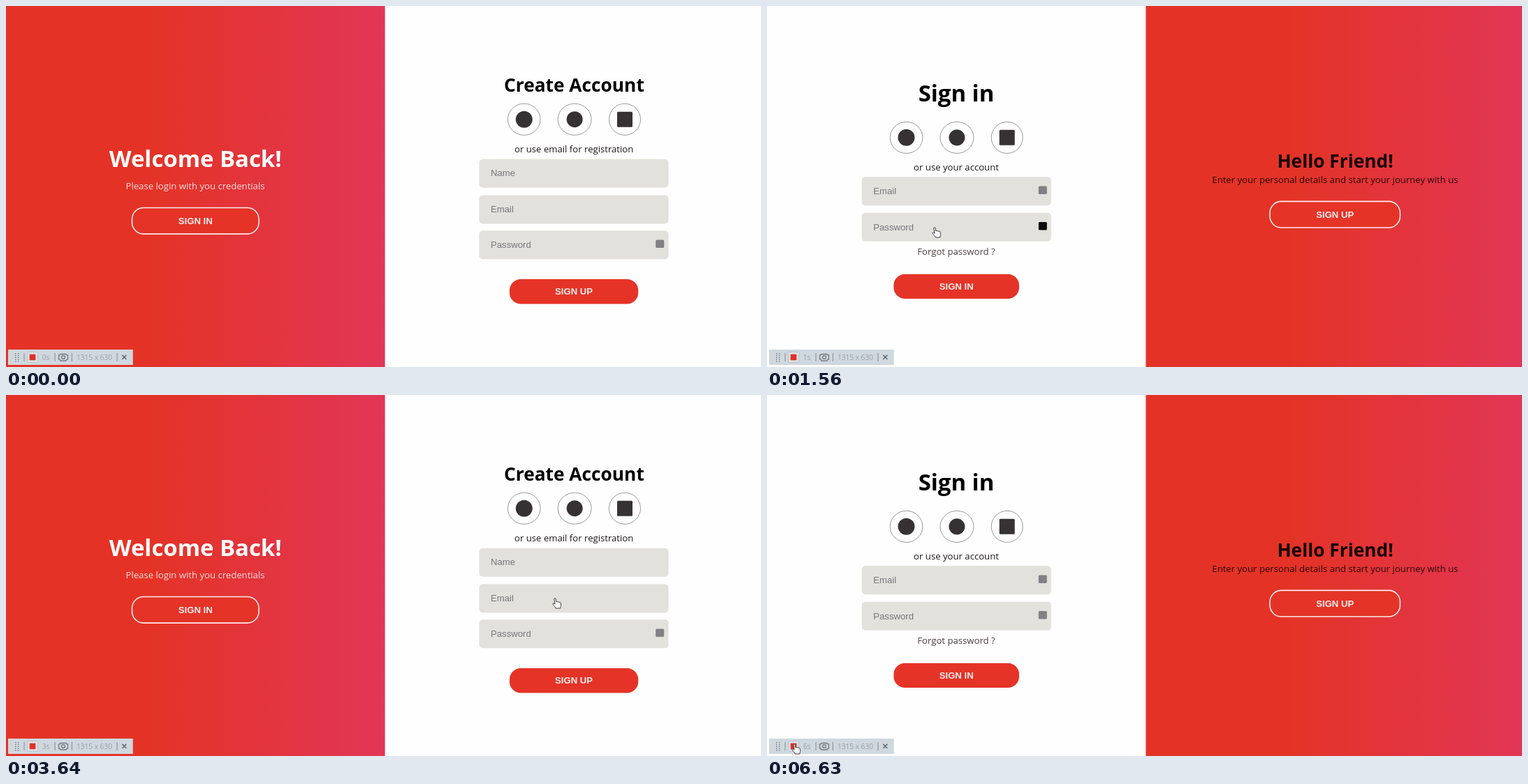
An HTML page for the animation above (6890 ms loop, 1081 px wide and 518 px high).

```html
<!DOCTYPE html>
<html lang="en">
<head>
<meta charset="utf-8">
<title>Sign in and sign up</title>
<style>
  html, body { margin: 0; width: 100%; height: 100%; overflow: hidden; background: #fefefe; }
  svg { display: block; width: 1081px; height: 518px; }
  text { font: 13.15px "Open Sans", sans-serif; text-anchor: middle; }
  .title { font-size: 26.3px; font-weight: 700; }
  .large { font-size: 32.9px; font-weight: 700; }
  .label { font: 700 13.15px "Liberation Sans", Arial, sans-serif; fill: #f4eeee; }
  .hint { font: 13.15px "Liberation Sans", Arial, sans-serif; fill: #77777a; text-anchor: start; }
  .bar { font-size: 10.1px; fill: #9b9fa4; text-anchor: start; }
</style>
</head>
<body>
<svg id="stage" viewBox="0 0 1081 518"></svg>
<script>
const RED = '#e53327';
const LOOP = 6890, STEP = 130;

const rect = (x, y, w, h, r, attrs) =>
  `<rect x="${x}" y="${y}" width="${w}" height="${h}" rx="${r}" ${attrs}/>`;
const text = (x, y, str, cls = '', attrs = '') =>
  `<text x="${x}" y="${y}" class="${cls}" ${attrs}>${str}</text>`;
const field = (x, y, hint) =>
  rect(x, y, 271, 41, 5, 'fill="#e2e1dc"') + text(x + 16.5, y + 24.7, hint, 'hint');
const fieldIcon = (x, y, id = '') =>
  rect(x, y, 12, 11.5, 1.5, `fill="#828084" id="${id}"`);
const solidButton = (x, y, w, label) =>
  rect(x, y, w, 35.3, 16, `fill="${RED}"`) + text(x + w / 2, y + 21.9, label, 'label');

// Outlined button with a hidden focus ring
const ghostButton = (x, y, w, label, ringId) =>
  rect(x, y, w, 37.6, 16.4, `fill="${RED}" stroke="#fbecec" stroke-width="1.6"`) +
  `<g id="${ringId}" fill="none">` +
  rect(x - 1, y - 1, w + 2, 39.6, 2.5, 'stroke="#fff" stroke-width="1.2"') +
  rect(x + .2, y + .2, w - .4, 37.2, 1.5, 'stroke="#111" stroke-width="1.6"') + '</g>' +
  text(x + w / 2, y + 23.2, label, 'label');

const socials = (x, y) =>
  [[0, 23.3], [72.4, 24], [144.2, 22.5]].map(([dx, rx]) =>
    `<ellipse cx="${x + dx}" cy="${y}" rx="${rx}" ry="22.6" fill="#fefefe" stroke="#999" stroke-width="1"/>`).join('') +
  `<g fill="#363234"><circle cx="${x}" cy="${y}" r="12"/><circle cx="${x + 72.4}" cy="${y}" r="11.5"/>` +
  rect(x + 133.2, y - 11, 22, 22, 1.5, '') + '</g>';

const signUpPage = `<g id="signUp">
  ${rect(0, 0, 542.6, 518, 0, 'fill="url(#warm)"')}
  ${text(271.2, 231, 'Welcome Back!', 'large', 'fill="#fff"')}
  ${text(271, 262.7, 'Please login with you credentials', '', 'fill="#fbdcdc"')}
  ${ghostButton(180.5, 289.5, 181.5, 'SIGN IN', 'signInRing')}
  ${text(813.4, 122.5, 'Create Account', 'title')}
  ${socials(741.8, 162.7)}
  ${text(813.2, 210.3, 'or use email for registration', '', 'fill="#1c1719"')}
  ${field(677.5, 219.7, 'Name')}${field(677.5, 271.4, 'Email')}${field(677.5, 322.3, 'Password')}
  ${fieldIcon(930.2, 335.4)}
  ${solidButton(721, 392.1, 184.2, 'SIGN UP')}
</g>`;

const signInPage = `<g id="signIn">
  ${rect(542.4, 0, 542.6, 518, 0, 'fill="url(#warm)"')}
  ${text(271, 137, 'Sign in', 'large')}
  ${socials(199.5, 188.8)}
  ${text(271, 235.8, 'or use your account', '', 'fill="#1c1719"')}
  ${field(135.8, 245.2, 'Email')}${field(135.8, 296.8, 'Password')}
  ${fieldIcon(388.8, 258.4)}${fieldIcon(388.8, 310, 'passwordIcon')}
  ${text(271, 356.8, 'Forgot password ?', '', 'fill="#4a4042"')}
  ${solidButton(181.4, 384.7, 179.6, 'SIGN IN')}
  ${text(813.6, 232, 'Hello Friend!', 'title', 'fill="#150304"')}
  ${text(813.4, 254.2, 'Enter your personal details and start your journey with us', '', 'fill="#2a0808"')}
  ${ghostButton(720, 280.4, 186.5, 'SIGN UP', 'signUpRing')}
</g>`;

const grip = Array.from({ length: 10 }, (_, i) =>
  rect(13 + (i % 2) * 4, 498 + (i >> 1) * 2.8, 1.4, 1.4, 0, 'fill="#777b80"')).join('');
const toolbar = `${rect(3, 493, 178.7, 22, 0, 'fill="#cfd8df"')}${grip}
  <path d="M26 498v12M70 498v12M94.3 498v12M159 498v12" stroke="#85898d"/>
  ${rect(30.5, 496.5, 15, 15, 1, 'fill="#dce2e6" stroke="#b5bcc2" stroke-width=".8"')}
  ${rect(33.7, 499.7, 8.6, 8.6, 0, 'fill="#df3026"')}
  ${text(51.7, 507.6, '0s', 'bar', 'id="seconds"')}
  <path d="M78 499.5h8l1.2 1.5h1.3v6h-1.3l-1.2 2h-8l-1.2-2h-1.3v-6h1.3z" fill="none" stroke="#777b80" stroke-width="1.3"/>
  <circle cx="82" cy="504" r="2.4" fill="none" stroke="#777b80" stroke-width="1.4"/>
  ${text(101, 507.6, '1315 x 630', 'bar')}
  <path d="M166.3 500.8l6 6.2m0-6.2l-6 6.2" stroke="#6c7074" stroke-width="1.7"/>`;

const hand = `<path id="hand" fill="#fff" stroke="#222" stroke-width=".9" stroke-linejoin="round"
  d="M-4.2-6.2c0-1.5 2.2-1.5 2.4 0l.7 4.2c.4-1 2-.9 2.2.2.5-.8 1.9-.6 2.1.5.6-.6 1.9-.3 2 .8
     l.4 3.2c.1 1.5-.7 2-.8 4.3h-6.6c-.2-1.7-2.3-3-4-5.600c-.7-1.300.8-2.100 1.700-1.200l1.200 1z"/>`;

const stage = document.getElementById('stage');
stage.innerHTML = `<defs><linearGradient id="warm">
    <stop offset=".38" stop-color="#e43326"/><stop offset="1" stop-color="#e23657"/>
  </linearGradient></defs>
  ${rect(0, 0, 1081, 518, 0, 'fill="#fefefe"')}${signUpPage}${signInPage}${toolbar}${hand}`;

// Pointer stops: time, x, y
const stops = [
  [130, 42, 508], [910, 243, 325], [2210, 243, 325], [3120, 789, 299],
  [3900, 789, 299], [4810, 289, 321], [5720, 289, 321], [6630, 42, 508]
];

function pointerAt(t) {
  const next = stops.findIndex(s => s[0] > t);
  if (next < 0) return stops[stops.length - 1].slice(1);
  if (next === 0) return stops[0].slice(1);
  const [t0, x0, y0] = stops[next - 1], [t1, x1, y1] = stops[next];
  const u = (t - t0) / (t1 - t0), ease = u * u * (3 - 2 * u);
  return [x0 + (x1 - x0) * ease, y0 + (y1 - y0) * ease];
}

const find = id => document.getElementById(id);
const show = (id, on) => find(id).setAttribute('visibility', on ? 'inherit' : 'hidden');
const within = (t, a, b) => t >= a && t < b;

function secondsAt(t) {
  return [910, 2340, 2990, 4030, 5070, 5980].filter(s => t >= s).length;
}

function draw(now) {
  const t = Math.floor(now % LOOP / STEP) * STEP;
  const signIn = within(t, 1560, 3640) || t >= 5330;
  const [x, y] = pointerAt(t);
  show('signUp', !signIn);
  show('signIn', signIn);
  show('signInRing', within(t, 1430, 1560) || within(t, 5070, 5330));
  show('signUpRing', within(t, 3380, 3640));
  show('hand', t >= STEP);
  find('hand').setAttribute('transform', `translate(${x} ${y})`);
  const hovered = within(x, 136, 407) && within(y, 297, 338);
  find('passwordIcon').setAttribute('fill', hovered ? '#0c0c0c' : '#828084');
  find('seconds').textContent = secondsAt(t) + 's';
}

const start = performance.now();
function tick() {
  draw(performance.now() - start);
  requestAnimationFrame(tick);
}
tick();
</script>
</body>
</html>
```
